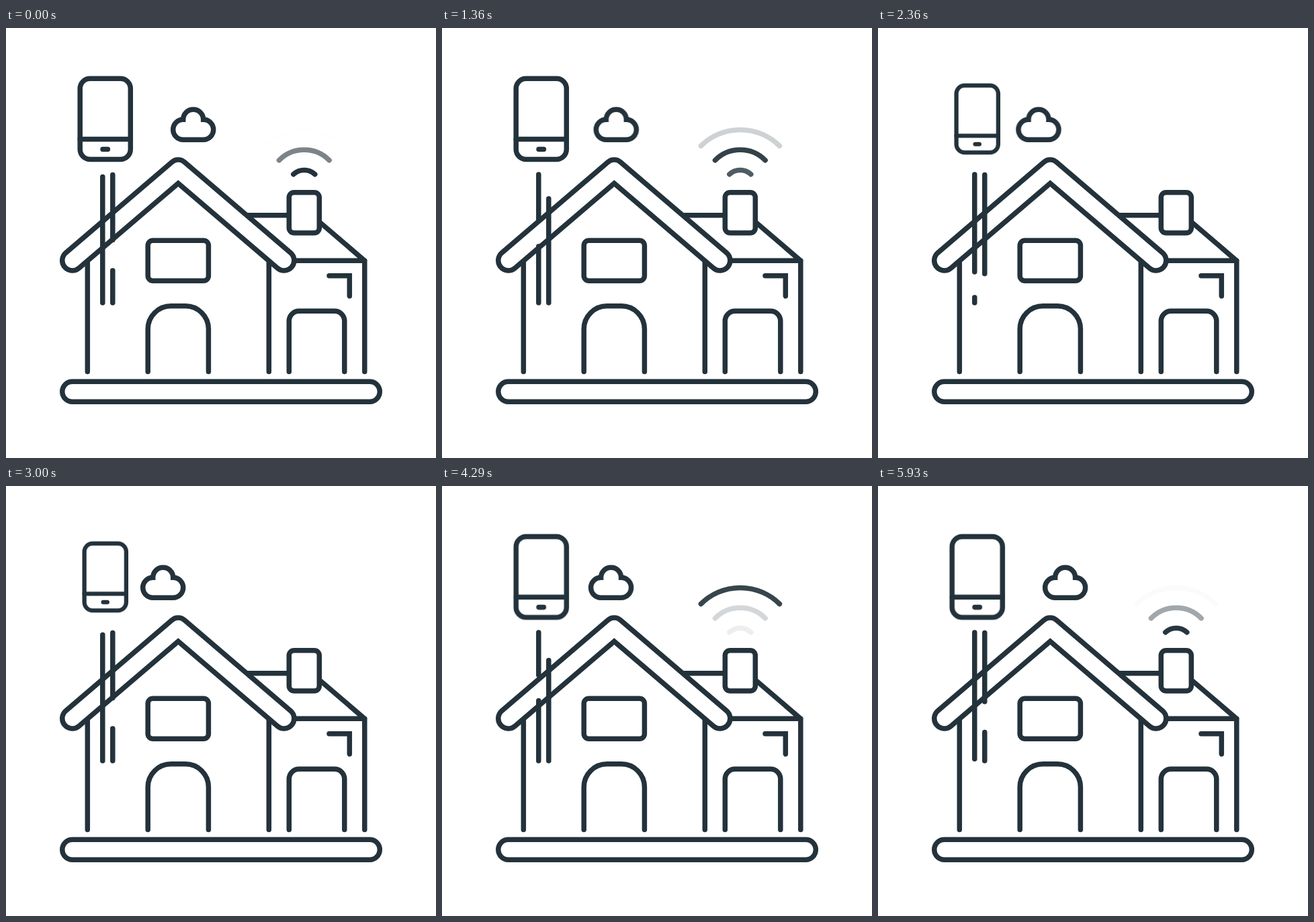
An HTML page for the animation above (6 s loop, 640 px wide and 640 px high).

```html
<!DOCTYPE html>
<html lang="en">
<head>
<meta charset="utf-8">
<title>Connected house</title>
<style>
html, body { margin: 0; width: 100%; height: 100%; overflow: hidden; background: #fff; }
svg { display: block; width: 100%; height: 100%; }
.ink { fill: none; stroke: #23323b; stroke-width: 7.5; stroke-linecap: round; }
.round { stroke-linejoin: round; }
.solid { fill: #fff; }

.cloud { animation: drift 3s cubic-bezier(.333, 0, .667, 1) infinite alternate; }
@keyframes drift { to { transform: translateX(-45px); } }

.phone { transform-origin: 147.75px 135.5px; animation: shrink 6s cubic-bezier(.333, 0, .667, 1) infinite; }
@keyframes shrink {
  0%, 29% { transform: none; }
  39%, 53.3% { transform: scale(.83); }
  60.7% { transform: scale(1.02); }
  66.7%, 100% { transform: none; }
}

.signal { animation: signal 6s ease-in-out infinite; }
@keyframes signal {
  0%, 28.3% { opacity: 1; }
  34.5%, 53.5% { opacity: 0; }
  58.5%, 100% { opacity: 1; }
}
.wave { animation: pulse 1.2s cubic-bezier(.333, 0, .667, 1) infinite; }
@keyframes pulse { 0%, 100% { opacity: 0; } 50% { opacity: 1; } }
.near { animation-delay: -615ms; }
.mid { animation-delay: -340ms; }
.far { animation-delay: -22ms; }

.down { stroke-dasharray: 190 38; animation: down 3s linear infinite; }
.up { stroke-dasharray: 190.5 45.5; animation: up 3s linear infinite; }
@keyframes down { from { stroke-dashoffset: -3.5; } to { stroke-dashoffset: -231.5; } }
@keyframes up { from { stroke-dashoffset: -142.5; } to { stroke-dashoffset: 93.5; } }
</style>
</head>
<body>
<svg viewBox="0 0 640 640">
  <g class="ink">
    <rect x="83.8" y="526.2" width="472.5" height="30" rx="15"/>

    <!-- garage -->
    <path class="round" d="M361 278.8H421M466.3 288.5L533.8 346.3H430M533.8 346.3V511.5"/>
    <path d="M421.3 511.5V436.3a15 15 0 0 1 15-15H488.8a15 15 0 0 1 15 15V511.5"/>
    <path d="M481 368.8H511.3V399"/>
    <rect class="solid" x="421.3" y="244.7" width="45" height="60.3" rx="7.5"/>

    <!-- house -->
    <path d="M121.3 348V511.5M391.3 348V511.5"/>
    <rect x="211.2" y="316.3" width="90.2" height="60" rx="7.5"/>
    <path d="M211.2 511.5V448a34.3 34.3 0 0 1 34.3-34.2H267.1a34.3 34.3 0 0 1 34.3 34.2V511.5"/>
    <path class="solid" d="M89 334.6L247.2 199.4a14 14 0 0 1 18.2 0L423.6 334.6a15 15 0 0 1-19.6 22.8L256.3 231.2L108.6 357.4a15 15 0 0 1-19.6-22.8Z"/>

    <!-- data streams -->
    <line class="down" x1="143.8" y1="218" x2="143.8" y2="409"/>
    <line class="up" x1="158.8" y1="218.5" x2="158.8" y2="409"/>

    <g class="phone">
      <rect x="110.2" y="75.3" width="75.1" height="120.2" rx="15"/>
      <path d="M110.2 165.4H185.3M144 180.4H151.4"/>
    </g>

    <path class="cloud" d="M263.7 166.2a15 15 0 0 1 0-30a15 15 0 0 1 30 0a15 15 0 0 1 0 30Z"/>

    <g class="signal">
      <path class="wave near" d="M427.8 217.7a23.5 23.5 0 0 1 32 0"/>
      <path class="wave mid" d="M406.5 196.8a52.5 52.5 0 0 1 74.6 0"/>
      <path class="wave far" d="M385.4 175.5a83 83 0 0 1 117 0"/>
    </g>
  </g>
</svg>
</body>
</html>
```
